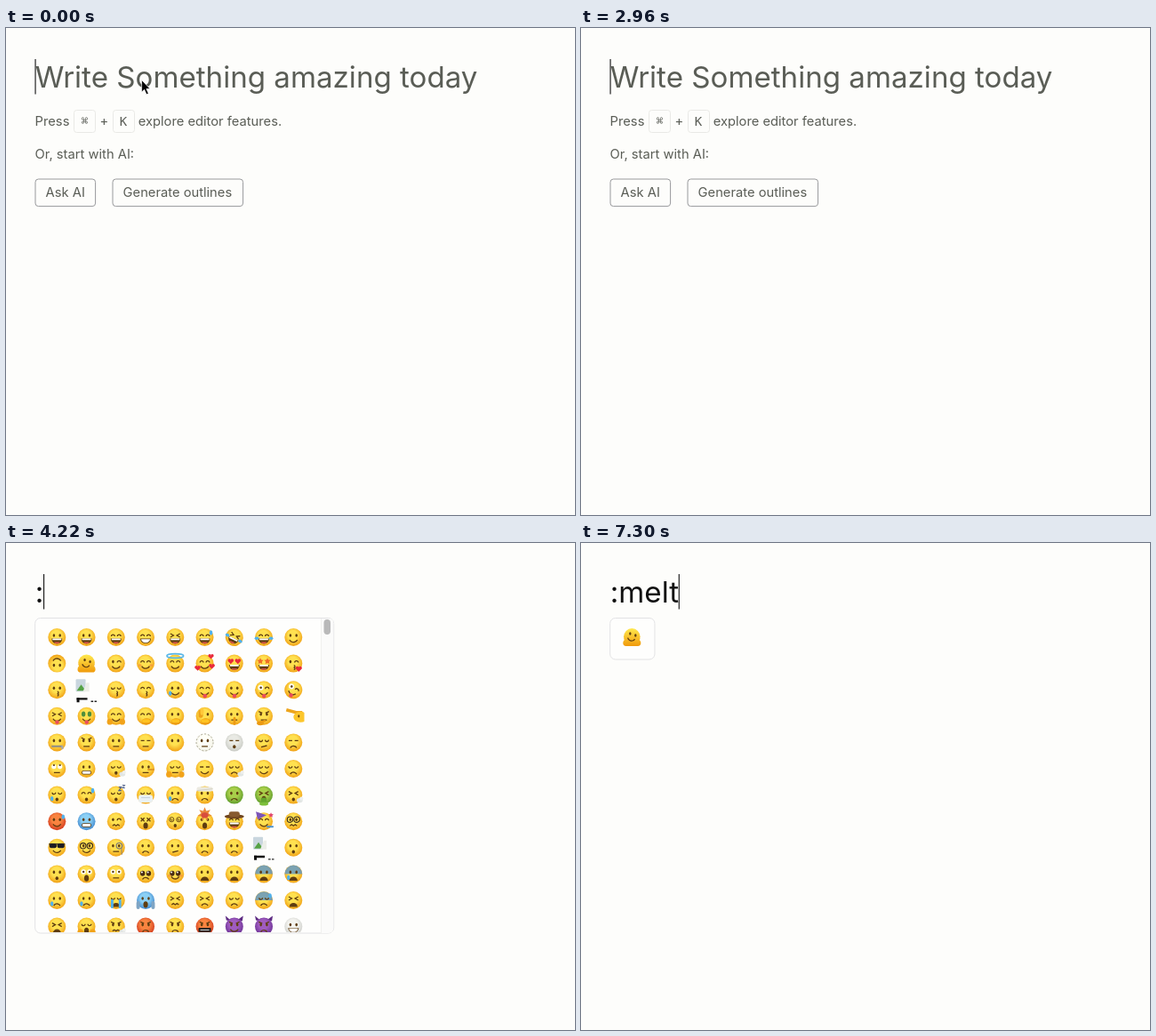
Recreate the animation shown at these times as an HTML page with a canvas. Size 640 by 548 pixels, loop 8 s.

```html
<!DOCTYPE html>
<html lang="en">
<head>
<meta charset="utf-8">
<title>Emoji picker</title>
<style>
html, body { margin: 0; width: 100%; height: 100%; overflow: hidden; background: #fdfdfb; }
svg, canvas { position: absolute; left: 0; top: 0; width: 640px; height: 548px; }
text { font-family: Inter, sans-serif; font-size: 14.73px; font-optical-sizing: none; fill: #5a5d56; white-space: pre; }
.big { font-size: 33.14px; }
.key { font-family: "DejaVu Sans Mono", monospace; font-size: 14px; text-anchor: middle; }
.btn { fill: none; stroke: #98999c; }
.kbd { fill: none; stroke: #e9e9e6; }
</style>
</head>
<body>
<canvas id="c" width="640" height="548"></canvas>
<svg viewBox="0 0 640 548">
  <g id="intro">
    <text class="big" x="32.8" y="67">Write Something amazing today</text>
    <text x="32.6" y="109.6">Press</text>
    <rect class="kbd" x="76.5" y="92.5" width="24" height="25" rx="3"/>
    <text class="key" x="88.6" y="109" style="font-size:13px">⌘</text>
    <text x="105.6" y="109.6">+</text>
    <rect class="kbd" x="120.5" y="92.5" width="24" height="25" rx="3"/>
    <text class="key" x="132" y="109.6">K</text>
    <text x="148.7" y="109.6">explore editor features.</text>
    <text x="32.6" y="146.8">Or, start with AI:</text>
    <rect class="btn" x="33" y="170" width="67.6" height="30.6" rx="3.5"/>
    <text x="44.6" y="190.2">Ask AI</text>
    <rect class="btn" x="120" y="170" width="146.6" height="30.6" rx="3.5"/>
    <text x="131.6" y="190.2">Generate outlines</text>
  </g>
  <text id="typed" class="big" x="32.8" y="67" style="fill:#111"></text>
  <rect id="caret" y="35" width="1.1" height="39.5" fill="#111"/>
  <path id="mouse" d="M152.6 58.5v13.6l3-2.8 2.4 5.4 2.3-1-2.4-5.2h4.1z" fill="#000" stroke="#fff" stroke-width=".7"/>
</svg>
<script>
const $ = id => document.getElementById(id);
const ctx = $('c').getContext('2d');
const PI = Math.PI, INK = '#5f3d10', SKIN = '#fcc62c', TEAR = '#4fb2ee';

function ell(x, y, rx, ry, color) {
  ctx.beginPath();
  ctx.ellipse(x, y, rx, ry, 0, 0, 2 * PI);
  ctx.fillStyle = color;
  ctx.fill();
}
function trace(pts) {
  ctx.beginPath();
  for (let i = 0; i < pts.length; i += 2) ctx.lineTo(pts[i], pts[i + 1]);
}
function line(pts, color = INK, w = 1.3) {
  trace(pts);
  ctx.strokeStyle = color;
  ctx.lineWidth = w;
  ctx.stroke();
}
function poly(pts, color) {
  trace(pts);
  ctx.closePath();
  ctx.fillStyle = color;
  ctx.fill();
}
function arc(x, y, r, a, b, color = INK, w = 1.3) {
  ctx.beginPath();
  ctx.arc(x, y, r, a, b);
  ctx.strokeStyle = color;
  ctx.lineWidth = w;
  ctx.stroke();
}
function half(x, y, rx, ry, up, color) {
  ctx.beginPath();
  ctx.ellipse(x, y, rx, ry, 0, up ? PI : 0, up ? 2 * PI : PI);
  ctx.fillStyle = color;
  ctx.fill();
}
function box(x, y, w, h, r, color) {
  ctx.beginPath();
  ctx.roundRect(x, y, w, h, r);
  ctx.fillStyle = color;
  ctx.fill();
}
function heart(x, y, s, color = '#e8293b') {
  ell(x - s * .48, y - s * .3, s * .55, s * .55, color);
  ell(x + s * .48, y - s * .3, s * .55, s * .55, color);
  poly([x - s, y - s * .1, x + s, y - s * .1, x, y + s], color);
}
function star(x, y, r, color, n = 5) {
  const pts = [];
  for (let i = 0; i < 2 * n; i++) {
    const a = i * PI / n - PI / 2, k = i % 2 ? r * .5 : r;
    pts.push(x + k * Math.cos(a), y + k * Math.sin(a));
  }
  poly(pts, color);
}
function pair(f, d = 3.4) { f(-d, -1); f(d, 1); }

// A face is coded as eyes, mouth, then any extras and skin.
const eyes = {
  n() {},
  o: () => pair(x => ell(x, -2, 1.3, 1.8, INK)),
  O: () => pair(x => { ell(x, -2.4, 2.7, 2.7, '#fff'); ell(x, -2.4, 1.2, 1.2, INK); }),
  '^': () => pair(x => arc(x, -1, 1.9, PI, 0)),
  u: () => pair(x => arc(x, -2.8, 1.9, 0, PI)),
  '-': () => pair(x => line([x - 2, -2, x + 2, -2])),
  x: () => pair((x, s) => line([x + 2 * s, -4, x - 1.6 * s, -2, x + 2 * s, 0])),
  X: () => pair(x => { line([x - 2, -4, x + 2, 0]); line([x + 2, -4, x - 2, 0]); }),
  w() { ell(-3.4, -2, 1.3, 1.8, INK); arc(3.4, -1, 2, PI, 0); },
  W() { ell(-3.6, -2.5, 3, 3, '#fff'); ell(-3.4, -2.5, 1.3, 1.3, INK); arc(3.6, -1, 2, PI, 0); },
  h: () => pair(x => heart(x, -2.6, 3.2), 4),
  s: () => pair(x => star(x, -2.6, 3.8, '#ee6d28'), 4),
  r: () => pair(x => { ell(x, -2.4, 2.6, 2.6, '#fff'); ell(x, -4, 1.2, 1.1, INK); }),
  p: () => pair(x => { ell(x, -.6, 2.7, 3, '#4a2c12'); ell(x - .8, -1.8, 1, 1, '#fff'); }),
  a() { eyes.o(); pair((x, s) => line([x + 2.4 * s, -5.2, x - 1.6 * s, -3.4])); },
  g() { pair(x => box(x - 4, -4.5, 8, 5, 2, '#1d1d22'), 4.4); line([-9, -4, 9, -4], '#1d1d22'); },
  G() { eyes.o(); pair(x => arc(x, -2, 3.2, 0, 2 * PI, '#3a2c1c', 1.1), 3.8); },
  m() { eyes.o(); arc(3.6, -2, 3.3, 0, 2 * PI, '#77777c', 1.2); line([6, 0, 6.5, 8], '#77777c', .8); },
  z: () => pair(x => { arc(x, -2, 2.6, 0, 2 * PI, INK, .9); arc(x, -2, 1.1, 0, 4.5, INK, .9); }, 4),
  $: () => pair(x => ell(x, -2.4, 2.2, 3, '#4f8f3c'))
};
const mouths = {
  n() {},
  ')': () => arc(0, .6, 5, .5, PI - .5),
  '(': () => arc(0, 8, 4, PI + .5, -.5),
  '-': () => line([-3.4, 4.4, 3.4, 4.4]),
  '/': () => line([-3, 5.2, 3.4, 3.6]),
  '~': () => line([-4, 5, -2, 3.6, 0, 5, 2, 3.6, 4, 5]),
  o: () => ell(0, 4.8, 1.7, 2, INK),
  O: () => ell(0, 4.8, 2.6, 3.6, INK),
  D() { half(0, 1.4, 6, 6, false, INK); box(-5, 1.4, 10, 1.8, .5, '#fff'); half(0, 5.6, 3, 1.6, false, '#e4574d'); },
  B() { half(0, 1.6, 6, 5.4, false, INK); half(0, 2.2, 5, 4, false, '#fff'); },
  t() { box(-5.4, 2, 10.8, 4.6, 2, INK); box(-4.6, 2.8, 9.2, 3, 1.2, '#fff'); },
  P() { mouths[')'](); box(-2, 4.6, 4.4, 4.4, 2, '#ea4d5c'); },
  '*': () => { arc(.5, 3.2, 1.2, -1.6, 1.6); arc(.5, 5.6, 1.2, -1.6, 1.6); },
  V: () => half(0, 7.6, 4.6, 4.6, true, INK),
  Z() { line([-6, 4.4, 6, 4.4], '#8b8b8b', 2); ell(6, 5.6, 1.3, 2.2, '#aaa'); },
  M() { box(-8, 0, 16, 8.4, 3, '#e9f1f5'); line([-5, 3, 5, 3], '#bccbd4', .8); },
  S() { box(-7, 1.5, 14, 4.6, 1, '#22201e'); line([-5, 3.8, 5, 3.8], '#ddd', 1); },
  h() { ell(1, 6, 5.4, 3.6, '#eb9a12'); box(-4, 3.4, 9, 4, 2, '#ffc321'); }
};
const extras = {
  t: () => pair((x, s) => ell(x + s, 1.2, 2.4, 1.7, TEAR), 7),
  s: () => ell(7, -5, 1.8, 2.8, TEAR),
  T: () => ell(-5.6, 4, 1.7, 2.7, TEAR),
  d: () => pair(x => box(x - 1.4, -1, 2.8, 10, 1, TEAR), 4.4),
  H() { ctx.beginPath(); ctx.ellipse(0, -8.6, 9.4, 2.4, 0, 0, 2 * PI); ctx.lineWidth = 1.6; ctx.strokeStyle = '#58b7e8'; ctx.stroke(); },
  L() { heart(-8, 5, 3.2); heart(8, 3, 3.2); heart(7, -8, 3); },
  k: () => heart(6, 6, 3.4),
  b: () => pair(x => ell(x, 2, 2, 1.3, '#f58a3d99'), 6.4),
  j: () => pair(x => ell(x, 6.4, 3.2, 3.4, '#f2a319'), 7),
  f: () => box(-1.2, 1, 2.8, 9, 1.3, '#eb9a12'),
  q() { ell(-4, 8, 4, 2.4, '#eb9a12'); line([-4, 7, 2, 5], '#eb9a12', 2); },
  l() { ell(7, 6, 3.4, 2.6, '#e2e6e4'); ell(9, 4, 2, 2, '#eef0ee'); },
  y: () => box(2, 0, 8, 2, 1, '#e19a25'),
  Q() { box(-7, -7, 5, 9, 2, '#eea21a'); ell(-3, -5, 2, 4, '#ffc83a'); },
  Z() { line([3, -9, 6, -9, 3, -5, 6, -5], '#4c5d86', 1.1); line([7, -11, 10, -11, 7, -8, 10, -8], '#4c5d86', 1); },
  w() { box(-9, -9, 18, 5, 2, '#eceae0'); line([-9, -5, 9, -7], '#cbc8b8', .7); },
  v() { box(-3, 3, 6, 8, 2, '#62a52d'); ell(0, 10, 5, 2, '#7cbf3a'); },
  c() { ell(0, -5.4, 11, 2.4, '#6e4521'); box(-6, -11, 12, 6, 2.4, '#875a2f'); },
  p() { poly([-9, -11, 3, -7, -7, -2], '#7c55b8'); star(8, -7, 3, '#e2476a'); box(3, 5, 8, 2, 1, '#4a92d0'); },
  x() { star(0, -8, 8, '#e8873a', 7); ell(0, -7, 4, 3, '#d84d3d'); },
  i: () => pair(x => box(x - 2, 1, 4, 9, 2, '#7fa5c4'), 8.4),
  e: () => pair((x, s) => poly([x - 3, -7, x + 3, -6, x + 4 * s, -12], '#5d2b82'), 6),
  A: () => pair((x, s) => poly([x - 3.4, -6, x + 3.4, -4, x + 2 * s, -11], '#f5b31c'), 6)
};
const skins = { R: ['#f98440', '#d2381d'], C: ['#8bd0f5', '#3f87cd'], E: ['#a9cf4a', '#5c9a2b'], U: ['#a05cc0', '#6a3093'],
  F: ['#fffff8', '#f1f0e4'], Y: ['#e9eae4', '#c9cbc4'], K: ['#f4f4f0', '#cfd0cc'] };

function face([eye, mouth, ...more]) {
  if (more.includes('!')) ctx.rotate(PI);
  if (more.includes('/')) ctx.rotate(.45);
  const tone = skins[more.find(m => skins[m])] || ['#ffe150', '#f09f14'];
  const g = ctx.createRadialGradient(-1, -3, 2, 0, -1, 11.4);
  g.addColorStop(.35, tone[0]);
  g.addColorStop(1, tone[1]);
  for (const m of 'eA') if (more.includes(m)) extras[m]();
  ell(0, 0, 10, 10, g);
  if (more.includes('N')) half(0, 0, 9.8, 9.8, true, '#5b94cbcc');
  if (more.includes('F')) {
    ctx.setLineDash([2, 2]);
    arc(0, 0, 9.5, 0, 7, '#a8a590', 1);
    ctx.setLineDash([]);
  }
  eyes[eye]();
  mouths[mouth]();
  for (const m of more) if (extras[m] && !'eA'.includes(m)) extras[m]();
}

const hairs = { b: '#b67c1c', d: '#805019', r: '#cf6425', w: '#dbd5bd', y: '#e0ac24', n: SKIN };
const shirts = { B: '#4478a0', P: '#84408c', W: '#e6ebea', K: '#30323a', G: '#6a8d3e' };

// A head is hair and style; a bust is hair, shirt, gear and long hair.
function head([hair, style]) {
  const h = hairs[hair];
  if (style === 'l') box(-10, -8, 20, 17, 7, h);
  if (style === 'k') for (let a = 2.6; a < 7; a += .6) ell(8 * Math.cos(a), 7 * Math.sin(a) - 1, 3.6, 3.6, h);
  if (style === 'u') ell(0, -9, 4, 3, h);
  half(0, -1, 9, 9, true, h);
  ell(0, 1, 7.6, 8.4, SKIN);
  if (style === 'v') half(0, 3, 7.4, 7, false, h);
  half(0, -3, 7.6, 5, true, h);
  pair(x => ell(x, 0, 1, 1.3, INK), 3);
  arc(0, 2.6, 3, .5, PI - .5, INK, 1);
}
function bust([hair, shirt, gear, long]) {
  const h = hairs[hair], s = shirts[shirt];
  if (gear === 'g') box(-10, -8, 20, 15, 1, '#4c7040');
  if (long) box(-6.4, -9, 12.8, 14, 5, h);
  box(-8, 3.4, 16, 7, 4, s);
  if (gear === 'A') pair((x, k) => line([x, 7, 9 * k, -1, 3 * k, -9], s, 3.2), 6);
  if (gear === 'q') pair((x, k) => { line([x, 8, 10 * k, 3], s, 3); ell(9.6 * k, 1, 2, 1.6, SKIN); }, 5);
  half(0, -4, 5.8, 6, true, h);
  ell(0, -2.4, 4.8, 5.6, SKIN);
  half(0, -4.6, 4.8, 3.2, true, h);
  pair(x => ell(x, -2.6, .7, .9, INK), 2);
  line([-1.4, .6, 1.4, .6], INK, .9);
  if (gear === 'X') { line([-8, 9, 7, 1], s, 3); line([8, 9, -7, 1], s, 3); pair(x => ell(x, 0, 2, 2, SKIN), 7.6); }
  if (gear === 's') { line([6, 8, 9, 2], s, 3); ell(9, -1, 2, 2.6, SKIN); }
  if (gear === 'm') { line([-6, 8, -3, 1], s, 3); ell(-1, -3, 3.2, 2, '#f0a91c'); }
  if (gear === 'c') { poly([0, -11, 9, -8, 0, -5, -9, -8], '#25272d'); line([7, -8, 7, -3], '#c9a23a', 1); }
  if (gear === 'f') { ell(0, -6, 9.6, 2.4, '#7b5a25'); half(0, -6, 5.4, 5, true, '#8f6b2e'); }
  if (gear === 'k') { box(-5, -11, 10, 6, 2.6, '#f1f1ea'); line([-5, -5.4, 5, -5.4], '#c8c8bc', .8); }
  if (gear === 'W') line([-9, -8, -4, -3], '#45423a', 1.2);
}
function hand(angle, fingers, thumb) {
  ctx.rotate(angle);
  box(-5, -1, 10, 10, 4, '#f3ae1b');
  for (let i = 0; i < fingers; i++) box(-4.6 + i * 2.4, -9 + i, 2.4, 12, 1.2, '#ffca30');
  if (thumb) line([4, 4, 9, -2], '#ffca30', 2.8);
}
const things = {
  M() {
    const g = ctx.createLinearGradient(0, -10, 0, 10);
    g.addColorStop(0, '#ffe94e');
    g.addColorStop(1, '#f09a0b');
    half(0, 0, 9.4, 10, true, g);
    ell(0, 1, 9.2, 7, g);
    box(-10, 3, 20, 7, 3.4, g);
    ell(-2, -4, 1.2, 1.7, INK);
    ell(4, -2, 1.2, 1.7, INK);
    arc(-.4, -.4, 4.4, .6, 2.9);
  },
  x() {
    box(-12, -12, 11, 14, 1, '#c9d6de');
    poly([-11, 1, -6, -6, -1, 1], '#55a245');
    poly([0, -8, 3, -8, 3, 2, -4, 2], '#eceee8');
    box(-11, 9, 12, 2.4, 0, '#111');
    box(-11, 9, 3, 5, 0, '#111');
    box(5, 12.4, 2.6, 1.4, 0, '#222');
    box(9, 12.4, 2.4, 1.4, 0, '#222');
  },
  S() { line([-8, -7, 3, -4, 10, -4], '#eda51d', 3.6); ell(8, 1, 8, 6, SKIN); ell(6, 0, 1, 1.6, INK); },
  a() { star(0, 0, 10.5, '#55386f', 8); ell(0, 0, 7.4, 6, '#604080'); pair(x => ell(x, -1, 1.6, 2, '#fff')); line([-3, 4, 3, 4], '#fff', 1); },
  k(pose) {
    pair(x => ell(x, 0, 3.2, 3.6, '#c69a63'), 8);
    ell(0, 0, 8.2, 9.4, '#76512c');
    ell(0, 2, 6.4, 6.6, '#dfb67b');
    if (pose !== 'e') pair(x => ell(x, -1, 1, 1.4, INK), 2.6);
    if (pose === 'e') pair(x => ell(x, -1.4, 3.6, 3, '#8c6236'));
    if (pose === 'h') pair(x => ell(x, 0, 2.6, 4, '#8c6236'), 8);
    if (pose === 'm') ell(0, 5, 5, 2.8, '#8c6236');
    else line([-3, 5, 3, 5]);
  },
  '!': () => { heart(0, -3, 5); ell(0, 7, 2.3, 2.3, '#e8293b'); },
  h: () => { heart(0, 0, 9); line([-7, 3, 7, -4], '#ecc690', 3.6); },
  l() { ctx.rotate(-.35); ell(0, 0, 9, 5, '#cc2740'); line([-7, 0, 7, 0], '#fff3ec', 1.2); },
  L() { ell(0, 0, 10, 5, '#d9415a'); box(-6, -1.6, 12, 2.4, 1, '#fff'); },
  v() { pair((x, s) => { arc(x, -7, 5, s > 0 ? 1 : .4, s > 0 ? 2.8 : 2.2, '#dc2e2e', 2.2); arc(x, 7, 5, s > 0 ? 3.5 : 4.1, s > 0 ? 5.3 : 5.9, '#dc2e2e', 2.2); }, 6); },
  r() { line([-10, 0, 2, 0, 9, 3], '#f5b120', 4); line([-2, -2, 8, -3], '#ffca30', 2); },
  R() { ctx.scale(-1, 1); things.r(); },
  1: () => hand(.1, 2),
  2: () => hand(-.5, 1, true),
  3: () => hand(0, 1),
  4() { box(-6, -2, 13, 11, 3, '#f7b51f'); line([-2, 0, 1, -9], '#ffca30', 4); },
  5() { ctx.rotate(PI); things[4](); },
  6() { box(-8, -6, 16, 13, 5, '#f7b51f'); for (let i = -4; i < 6; i += 4) line([i, -5, i, 1], '#cc8712', .9); },
  7: () => pair((x, s) => { ctx.save(); ctx.translate(x, 0); ctx.rotate(s * .5); ctx.scale(.6, 1); hand(0, 4); ctx.restore(); }, 5),
  8() { line([-6, -8, -6, 5, 6, 6], '#3e4a50', 5); ell(3, 3, 5, 4, '#2f393e'); ell(-4, -7, 3, 2.6, '#58666d'); },
  9() { line([-3, -8, 3, -4, 1, 3, 3, 9], '#4d575c', 3); ell(3, -4, 2, 2, '#93a0a4'); },
  0() { ell(0, 2, 6.6, 8, '#c33745'); line([-3, -9, -1, -2, 4, 4], '#5570ab', 2); line([3, -9, 2, -3], '#e5737c', 2.4); },
  C() { box(-7, -2, 12, 6, 3, '#bf8a4a'); ell(-1, -3, 4, 4, '#bf8a4a'); line([-5, 2, -5, 10], '#a87538', 2); line([3, 2, 3, 10], '#a87538', 2); line([4, 0, 7, -7, 10, -7], '#bf8a4a', 2.6); },
  w() { half(0, -5, 10, 13, false, '#4a9440'); half(0, -5, 8, 10.4, false, '#e84a4e'); pair(x => ell(x, -1, .8, 1.2, '#222')); },
  g() { ell(0, 1, 9, 9, '#a8c860'); arc(0, 1, 5, 0, 7, '#d5e29a', 1); line([0, -8, 2, -11], '#6b7d33', 1.5); }
};

function emoji(code, x, y) {
  ctx.save();
  ctx.translate(x, y);
  const rest = code.slice(1);
  if (code[0] === '#') things[code[1]](code[2]);
  else if (code[0] === '%') head(rest);
  else if (code[0] === '@') bust(rest);
  else face(code);
  ctx.restore();
}

const people = `%b %bv %bl %r %bk %w %n %bl %rl %yk %wl %n %yl %y %w %wu
  @bB @bP-l @bB @bP-l @bBX @bPXl @bBA @bPAl @bBs @bPsl @bBs @bPsl @yKW @yKWl @bBX @bPXl @bBm @bBm
  @bPml @bBq @bPql @bW @bW-l @bKc @bKcl @bGg @bGgl @bW @bW-l @bGf @bGfl @bGfl @bWk @bWkl @bK @bK-l`;
const lists = {
  ':': `oD oD ^D ^B xD ^Ds xD/t ^Dt o)  o)! #M w) ^)b ^)H ^)L hD sD w*k
    o* #x u* ^* o)T ^P oP WP WP/  xP $P ^)j ^h oh oh^Q o-f a-q #S
    oZ a- o- -- on o-F -oY u/ -(  r- ot uol o-y u-lj -) u(l u) u(
    uoT ^os uoZ uM o(T o(w o(E xOEv xol  o)Rs otC w~ XO zo oOx ^Dc ^)p o)GS
    g) G) m- o( o/ o( o( #x oo  oo OO O- p( p)b oV oV oVN oVNT
    o(T o(T uVd oOCi x~ x( u( u(Ns xV  xV uOj a~l a(R a( aSR a)Ue a(Ue oBK`.replace('o)GS', 'G~'),
  ':m': `^D ^B o) #M ^)b ^)H ^)L hD #x  ^* o)T $P ^)j ^h oh oZ on u/
    -( ot uM o(T xOEv g) m- o/ oo  oV oOCi a~l aSR a)Ue #a ^DA hDA u)A
    #ke #kh #km #! #h #l #v #r #R  #1 #2 #3 #4 #5 #6 #7 #8 #9  #0 #L ` + people,
  ':me': `#M #h #! #0 ` + people,
  ':mel': '#M #C #C #w #g',
  ':melt': '#M'
};
const thumbs = { ':': 17, ':m': 59, ':me': 100 };

function panel(text) {
  ctx.clearRect(0, 0, 640, 548);
  if (!text) return;
  const items = lists[text].trim().split(/\s+/), thumb = thumbs[text];
  const w = thumb ? 336 : 17 + 33.25 * items.length, h = thumb ? 354.5 : 46.5;
  ctx.save();
  box(32.7, 84.5, w, h, 6, '#fefefd');
  ctx.strokeStyle = '#e2e2e4';
  ctx.lineWidth = 1;
  ctx.stroke();
  ctx.clip();
  if (thumb) {
    box(354, 85, 14.5, 354, 0, '#fbfbfa');
    line([354.5, 85, 354.5, 439], '#f0f0ee', 1);
    box(357.5, 86, 7.5, thumb, 3.7, '#b9b9b9');
  }
  ctx.beginPath();
  ctx.rect(40, 85, 295.5, 353);
  ctx.clip();
  items.slice(0, 108).forEach((code, i) =>
    emoji(code, 57.3 + i % 9 * 33.25, 106 + Math.floor(i / 9) * 29.6));
  ctx.restore();
}

const LOOP = 8000, BLINK = 1180;
const keys = [[-200, ''], [3500, ':'], [5880, ':m'], [6200, ':me'], [6520, ':mel'], [6860, ':melt']];
let shown = null;

function frame(now) {
  const t = now % LOOP;
  const [since, text] = keys.filter(k => k[0] <= t).pop();
  if (text !== shown) {
    shown = text;
    $('typed').textContent = text;
    $('intro').style.display = text ? 'none' : '';
    panel(text);
  }
  const end = text ? $('typed').getComputedTextLength() : 0;
  $('caret').setAttribute('x', 32.5 + end);
  $('caret').style.display = Math.floor((t - since) / BLINK) % 2 ? 'none' : '';
  $('mouse').style.display = t < 2500 ? '' : 'none';
  requestAnimationFrame(frame);
}
requestAnimationFrame(frame);
</script>
</body>
</html>
```
